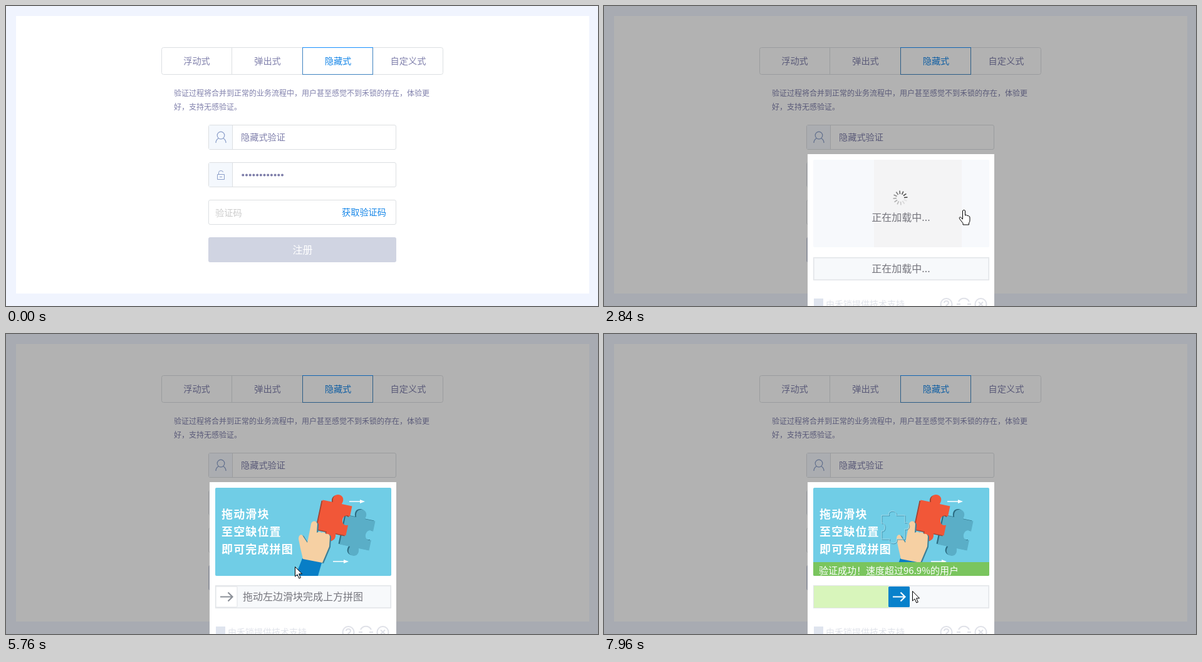
Recreate the animation shown at these times as an HTML page. Size 945 px wide and 480 px high, loop 8000 ms.

```html
<!DOCTYPE html>
<html lang="zh-CN">
<head>
<meta charset="utf-8">
<title>隐藏式验证</title>
<style>
html, body { margin: 0; width: 100%; height: 100%; overflow: hidden; background: #f0f4fe; }
svg { display: block; width: 100%; height: 100%; }
text { font: 14.2px "Noto Sans CJK SC", "Noto Sans CJK", "Noto Sans CJK JP", sans-serif; fill: #8080ac; }
.mid { text-anchor: middle; }
.big { font-size: 16px; }
.note { font-size: 12px; }
.box { fill: #fff; stroke: #dcdfe2; }
.icon { fill: none; stroke: #8c9fca; stroke-width: 1.2; }
.link { fill: #1787e8; }
.grey { fill: #75757d; }
.foot { fill: none; stroke: #dfe1e8; stroke-width: 2; }
.slogan { font-size: 18px; font-weight: 700; letter-spacing: 1.15px; fill: #fff; }
.cursor { fill: #fff; stroke: #000; stroke-linejoin: round; }
</style>
</head>
<body>
<svg viewBox="0 0 945 480">
  <defs>
    <path id="jigsaw" d="M1 8H13C9-1 27-1 24 8H38V20C47 17 47 33 38 30V46H25C28 55 10 55 14 46H1V33C8 36 8 18 1 21Z"/>
    <clipPath id="pieceClip"><use href="#jigsaw" x="442" y="282"/></clipPath>
    <clipPath id="pictureClip"><rect x="334" y="246" width="281" height="141" rx="2"/></clipPath>
    <path id="tile" transform="rotate(12)" d="M-24-24H-7C-14-42 14-42 7-24H24V-7C10-13 10 13 24 7V24H7C14 42-14 42-7 24H-24Z"/>
    <path id="palm" d="M-4 2L-7-4M-1 1L-2.5-8M2 1L2-8M5 2L6.5-5M-3 6L-8 2M-4 2H5L4 8H-2Z"/>
    <path id="dart" d="M0-.7H17V-3L25 0 17 3V.7H0Z" fill="#fff"/>
    <path id="hand" d="M487 304C488 298 496 298 497 304L496 318Q500 315 504 318 508 316 511 320 516 319 517 324L516 340 505 366 474 360 470 343 467 328C467 320 473 319 475 325L481 334Z"/>
    <g id="picture">
      <rect x="334" y="246" width="281" height="141" fill="#70cde6"/>
      <text class="slogan" x="344" y="294.5">拖动滑块</text>
      <text class="slogan" x="344" y="322.5">至空缺位置</text>
      <text class="slogan" x="344" y="350.5">即可完成拼图</text>
      <use href="#tile" x="559" y="317" fill="#2c6c82"/>
      <use href="#tile" x="561" y="318" fill="#5aaec7"/>
      <use href="#tile" x="522" y="295" fill="#9c4433"/>
      <use href="#tile" x="524" y="294" fill="#f15738"/>
      <use href="#hand" x="2" y="1" fill="#3d7f96"/>
      <path d="M473 359L504 366 498 387H462Z" fill="#087ec6"/>
      <use href="#hand" fill="#f6d0a3"/>
      <use href="#dart" x="548" y="268"/>
      <use href="#dart" x="522" y="364"/>
    </g>
  </defs>

  <rect width="945" height="480" fill="#f0f4fe"/>
  <rect x="16" y="16" width="915" height="444" fill="#fff"/>

  <rect class="box" x="248.5" y="66.5" width="449" height="43" rx="3"/>
  <path class="box" d="M360.5 67V109"/>
  <rect x="473.5" y="66.5" width="112" height="43" fill="#fff" stroke="#3f83c0"/>
  <path d="M473 66.5H586" stroke="#1890ff"/>
  <g class="mid">
    <text x="304.5" y="93.3">浮动式</text>
    <text x="417.5" y="93.3">弹出式</text>
    <text class="link" x="530" y="93.3">隐藏式</text>
    <text x="642" y="93.3">自定义式</text>
  </g>
  <text class="note" x="268" y="144">验证过程将合并到正常的业务流程中，用户甚至感觉不到禾锁的存在，体验更</text>
  <text class="note" x="268" y="166">好，支持无感验证。</text>

  <rect class="box" x="323.5" y="190.5" width="299" height="39" rx="2.5"/>
  <rect class="box" x="323.5" y="250.5" width="299" height="39" rx="2.5"/>
  <rect class="box" x="323.5" y="310.5" width="299" height="39" rx="2.5"/>
  <path d="M324 191H361V229H324ZM324 251H361V289H324Z" fill="#f4f8fd"/>
  <path class="box" d="M361.5 191V229M361.5 251V289"/>
  <g class="icon">
    <circle cx="343" cy="207" r="5.8"/>
    <path d="M335 219Q335 214 339.5 211.5M351 219Q351 214 346.5 211.5"/>
    <path d="M337.5 269.5H348.5V277.5H337.5ZM339.5 269V266.5Q339.5 263.5 343 263.5T346.5 266M341 273.5H345" stroke-width="1"/>
  </g>
  <text x="375" y="215.3">隐藏式验证</text>
  <g id="dots" fill="#7c7ca8"></g>
  <text x="334" y="336" style="fill:#ccc">验证码</text>
  <text class="link" x="536" y="335.3">获取验证码</text>
  <rect x="323" y="370" width="300" height="40" rx="3" fill="#d0d4e2"/>
  <text class="mid big" x="473.5" y="396" style="fill:#fff">注册</text>

  <g id="modal">
    <rect width="945" height="480" opacity=".3"/>
    <rect x="325" y="237" width="298" height="243" fill="#fff"/>
    <rect x="334.5" y="402.5" width="280" height="36" fill="#f7f9fb" stroke="#e2e5e8"/>
    <rect x="335.5" y="403.5" width="278" height="34" fill="none" stroke="#eceef1"/>

    <g id="loading">
      <rect x="334" y="246" width="281" height="140" rx="2" fill="#f7f9fc"/>
      <rect x="431" y="246" width="140" height="140" fill="#f4f4f5"/>
      <g id="spinner" stroke="#333" stroke-width="1.7"></g>
      <text class="mid big grey" x="474" y="344">正在加载中...</text>
      <text class="mid big grey" x="474" y="426">正在加载中...</text>
    </g>

    <g id="puzzle">
      <g clip-path="url(#pictureClip)">
        <use href="#picture"/>
        <use id="gap" href="#jigsaw" x="442" y="282" fill="#e3f4fc" stroke="#86c2d6"/>
      </g>
      <g id="piece">
        <use href="#picture" clip-path="url(#pieceClip)"/>
        <use href="#jigsaw" x="443" y="283" fill="none" stroke="#35809b" opacity=".8"/>
        <use href="#jigsaw" x="442" y="282" fill="none" stroke="#a6e1f2" stroke-width=".8"/>
      </g>
      <g id="success" clip-path="url(#pictureClip)">
        <g id="banner">
          <rect x="334" y="365" width="281" height="30" fill="#7ac55e"/>
          <text x="343" y="384" style="fill:#fff;font-size:15px">验证成功！速度超过96.9%的用户</text>
        </g>
      </g>
      <text id="hint" class="mid big grey" x="474" y="426">拖动左边滑块完成上方拼图</text>
      <rect id="fill" x="335" y="403" height="35"/>
      <g id="slider">
        <rect id="knob" y="404" width="34" height="33" rx="1.5"/>
        <path id="knobArrow" d="M7 420.5H26M19.5 413.5L26.5 420.5 19.5 427.5" fill="none" stroke-width="2.2"/>
      </g>
    </g>

    <rect x="335" y="468" width="15" height="15" fill="#dfe4ee"/>
    <text x="354" y="482" style="fill:#dfe2e9;font-size:14px">由禾锁提供技术支持</text>
    <g class="foot">
      <circle cx="546.5" cy="477" r="9"/>
      <path d="M543 475Q543 472 546.5 472T550 475Q550 477 546.5 479V480"/>
      <path d="M566 473A9.5 9.5 0 0 1 583 473M563 477H569M580 477H586"/>
      <circle cx="601.5" cy="477" r="9"/>
      <path d="M598 473.5L605 480.5M605 473.5L598 480.5"/>
    </g>
  </g>

  <g id="cursor">
    <circle id="press" r="12.5" fill="#e8e42c" opacity=".58"/>
    <path id="arrow" class="cursor" d="M.5 .5V16L4 12.8 6.8 19 9.3 18 6.6 11.8H11.5Z"/>
    <path id="pointer" class="cursor" d="M.5 15V2Q.5 .5 2.5 .5T4.5 2V9Q7 7.5 8 9.5 10 8.5 10.5 10.5 12 10 12 13V17Q12 20 10.5 21V24H1V21.5L-4.5 14.5Q-5.5 12-3.5 11.5L.5 15Z"/>
    <g id="grab" stroke-linecap="round" stroke-linejoin="round">
      <use href="#palm" stroke="#222" stroke-width="4.4"/>
      <use id="grabSkin" href="#palm" stroke-width="2.4"/>
    </g>
  </g>
</svg>
<script>
const LOOP = 8000, STEP = 70;
const el = {};
document.querySelectorAll('[id]').forEach(node => el[node.id] = node);
const set = (node, attrs) => { for (const k in attrs) node.setAttribute(k, attrs[k]); };
const show = (node, on) => { node.style.display = on ? '' : 'none'; };
const move = (node, x, y) => set(node, { transform: `translate(${x} ${y})` });
const linear = p => p;
const easeOut = p => 1 - (1 - p) ** 2;
const easeInOut = p => p * p * (3 - 2 * p);

function add(parent, tag, attrs) {
  const node = document.createElementNS('http://www.w3.org/2000/svg', tag);
  set(node, attrs);
  parent.append(node);
}
for (let i = 0; i < 12; i++) {
  add(el.dots, 'circle', { cx: 378.3 + i * 5.7, cy: 270.5, r: 2 });
  add(el.spinner, 'path', { d: 'M0-6V-11.5', transform: `rotate(${-30 * i})`, opacity: 0.04 + 0.9 * (1 - i / 12) ** 1.2 });
}

// Each key: [time, values, easing towards the key]
function track(keys, t) {
  const i = keys.findIndex(key => key[0] > t);
  if (i === 0) return keys[0][1];
  if (i < 0) return keys.at(-1)[1];
  const [t0, from] = keys[i - 1], [t1, to, ease = linear] = keys[i];
  const p = ease((t - t0) / (t1 - t0));
  return from.map((v, n) => v + (to[n] - v) * p);
}
const cursorKeys = [
  [1250, [775, 470]], [2020, [575, 330], easeOut], [2170, [572, 327]], [2369, [572, 327]],
  [2370, [572, 326]], [5340, [572, 326]], [6170, [354.5, 416], easeInOut]
];
const dragKeys = [[6300, [0]], [6580, [37]], [7070, [109]], [7290, [119]]];
const exitKeys = [[7550, [474, 412]], [7830, [492, 411], easeOut]];
const bannerKeys = [[7550, [23]], [7960, [0]]];

const bursts = [0, 1250, 2100, 2370, 2640, 2840, 5410, 6300, 7140, 7620, 7960];
function sample(t) {
  const start = bursts.findLast(b => b <= t);
  return start + Math.floor((t - start) / STEP) * STEP;
}

function draw(time) {
  const t = sample(time);
  const loaded = t >= 5150, dragging = t >= 6300, done = t >= 7620;
  const [drag] = track(dragKeys, t);
  let [x, y] = track(cursorKeys, t);
  if (dragging) x = 354.5 + drag;
  if (done) [x, y] = track(exitKeys, t);
  const onSlider = loaded && x < 369 && y > 403 || dragging;
  const onLink = t < 3100 && x < 607 && y < 340;
  const pressed = t >= 2640 && t < 2710 || dragging && t < 7290;

  show(el.modal, t >= 2840);
  show(el.loading, !loaded);
  show(el.puzzle, loaded);
  set(el.spinner, { transform: `translate(473 307) rotate(${85 + (t - 2840) / 1400 * 360})` });

  show(el.gap, dragging);
  show(el.piece, dragging);
  show(el.hint, !dragging);
  move(el.piece, Math.round((drag - 119) * 0.95), 0);
  move(el.slider, Math.round(335 + drag), 0);
  set(el.knob, { fill: onSlider ? '#0881cb' : '#fff', stroke: onSlider ? 'none' : '#dfe2e6' });
  set(el.knobArrow, { stroke: onSlider ? '#fff' : '#8b9098' });
  set(el.fill, { width: drag, fill: done ? '#d8f5bb' : '#e4f5ff' });
  show(el.success, done);
  move(el.banner, 0, track(bannerKeys, t)[0]);

  const grabbing = onSlider && !done;
  const skin = pressed ? '#f7f68a' : '#fff';
  show(el.cursor, t >= 1250);
  move(el.cursor, Math.round(x), Math.round(y));
  show(el.press, pressed);
  show(el.pointer, onLink);
  show(el.grab, grabbing);
  show(el.arrow, !onLink && !grabbing);
  set(el.grabSkin, { stroke: skin, fill: skin });
}

const begin = performance.now();
function frame() {
  draw((performance.now() - begin) % LOOP);
  requestAnimationFrame(frame);
}
frame();
</script>
</body>
</html>
```
